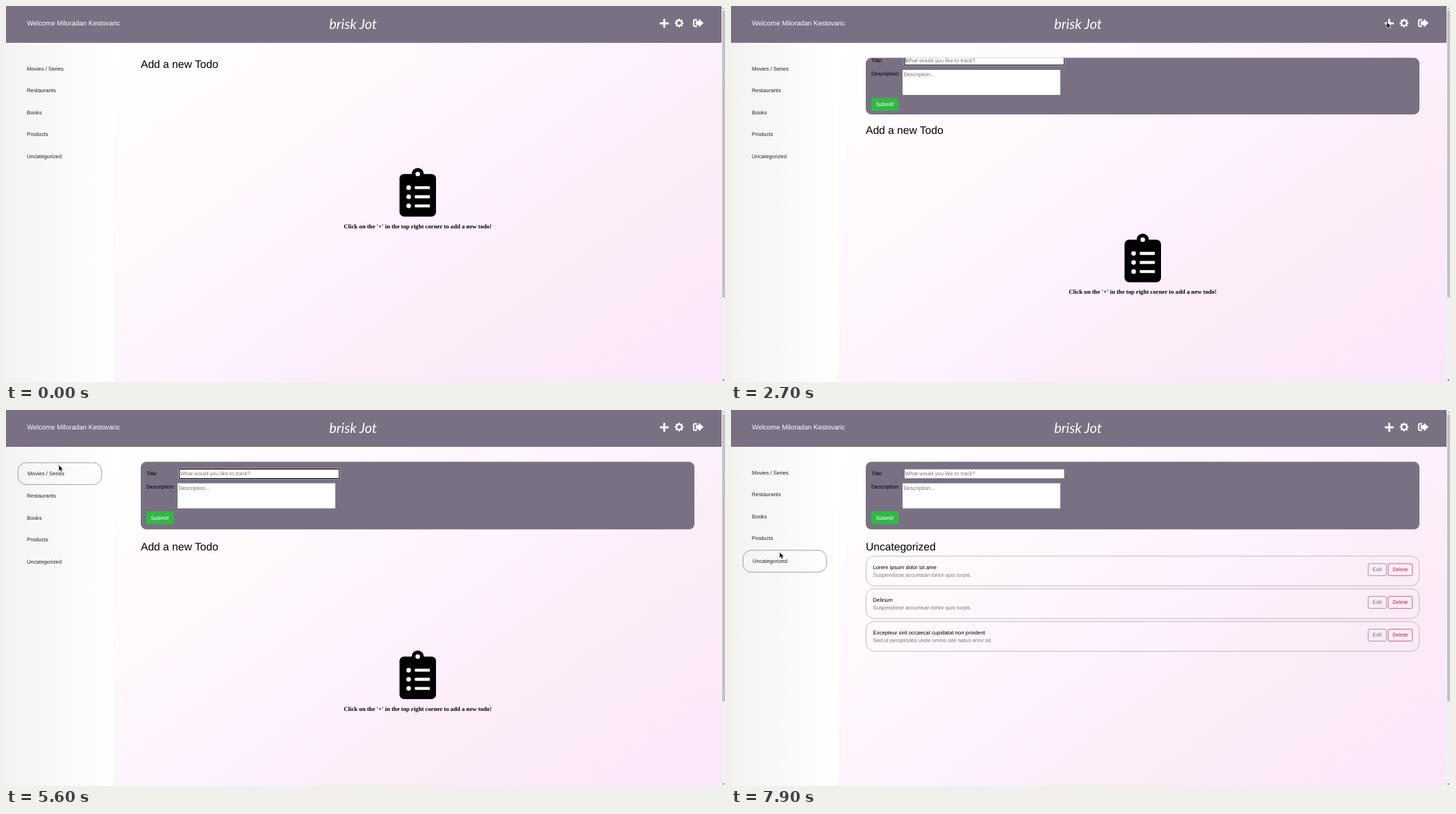
An HTML page for the animation above (8 s loop, 1035 by 541 pixels).

```html
<!DOCTYPE html>
<html lang="en">
<head>
<meta charset="utf-8">
<title>Todo list</title>
<style>
html, body { margin: 0; width: 100%; height: 100%; overflow: hidden; }
svg { display: block; width: 1035px; height: 541px; }
text { font: 7.76px "Liberation Sans", Arial, sans-serif; text-rendering: geometricPrecision; white-space: pre; }
#nav text { fill: #222; }
#heading { font-size: 15.6px; }
.hint { fill: #757575; }
.mid { text-anchor: middle; }
</style>
</head>
<body>
<svg viewBox="0 0 1035 541">
  <defs>
    <linearGradient id="side"><stop stop-color="#f3f4f2"/><stop offset="1" stop-color="#fffffe"/></linearGradient>
    <linearGradient id="page" x2="1" y2="1">
      <stop stop-color="#fff"/><stop offset=".25" stop-color="#fff8fc"/><stop offset=".5" stop-color="#fdf0ff"/>
      <stop offset=".56" stop-color="#fceef8"/><stop offset=".9" stop-color="#fbe6fb"/>
    </linearGradient>
    <clipPath id="clip"><rect id="opening" x="194" y="74.6" width="797" height="0" rx="8"/></clipPath>
    <filter id="shadow" x="-30%" y="-30%" width="160%" height="190%">
      <feDropShadow dx="0" dy="4.3" stdDeviation="4.3" flood-opacity=".2"/>
    </filter>
  </defs>

  <rect x="155" y="53" width="875" height="640" fill="url(#page)"/>
  <rect y="53" width="155" height="488" fill="url(#side)"/>
  <rect width="1030" height="53" fill="#7a7083"/>
  <rect x="1030" width="5" height="541" fill="#f1f1f1"/>
  <rect x="1031" y="6.5" width="4" height="413" fill="#c1c1c1"/>
  <path d="M1031.2 4l1.5-2 1.5 2z" fill="#999"/>
  <path d="M1031.2 537.5l1.5 2 1.5-2z" fill="#444"/>

  <g fill="#fff">
    <text x="30.3" y="28.4" style="font-size:9.72px">Welcome Miloradan Kestovaric</text>
    <text class="mid" x="499.5" y="33" style="font:italic 20px Lato,sans-serif">brisk Jot</text>
  </g>
  <g fill="none" stroke="#fff">
    <path d="M947.6 19.8v10.4M942.4 25h10.4" stroke-width="2.9" stroke-linecap="round"/>
    <circle cx="969" cy="24.5" r="3.8" stroke-width="2.3"/>
    <circle cx="969" cy="24.5" r="5.3" stroke-width="2" pathLength="16" stroke-dasharray="1" stroke-dashoffset=".5"/>
    <path d="M994.7 19.8h-2.8q-2 0-2 2v5.5q0 2 2 2h2.8" stroke-width="1.9"/>
    <path d="M993.2 22h4.7v-2.8l5.8 5.3-5.8 5.4v-2.9h-4.7z" fill="#fff" stroke-width=".8" stroke-linejoin="round"/>
  </g>

  <g id="nav"></g>
  <rect id="pill" x="17.2" width="120.5" height="31.4" rx="12" fill="none" stroke="#666" stroke-width=".6"/>

  <g clip-path="url(#clip)">
    <rect x="194" y="74" width="797" height="99" fill="#7a7083"/>
    <g id="form">
      <text x="202" y="94.2">Title:</text>
      <text x="202" y="113.2">Description:</text>
      <rect x="250" y="85.4" width="229.5" height="12.8" fill="#fff"/>
      <g id="focus" fill="none">
        <rect x="248.5" y="84" width="232" height="15.4" rx="1.8" stroke="#fff" stroke-width=".6"/>
        <rect x="249.4" y="84.9" width="230.2" height="13.7" rx="1" stroke="#101010" stroke-width="1.1"/>
      </g>
      <text class="hint" x="250.8" y="94.2">What would you like to track?</text>
      <path id="caret" d="M251.3 87v9" stroke="#000" stroke-width=".6"/>
      <rect x="247" y="105.5" width="227" height="36" fill="#fff"/>
      <text class="hint" x="248.4" y="114.9">Description...</text>
      <rect x="202" y="146" width="39.6" height="18.5" rx="2.2" fill="#31b845"/>
      <text class="mid" x="221.6" y="158" fill="#fff">Submit!</text>
    </g>
  </g>

  <g id="body">
    <text id="heading" x="194" y="89"></text>
    <g id="empty">
      <rect x="566.5" y="241.7" width="52.5" height="61.3" rx="6.5"/>
      <circle cx="592.7" cy="241.7" r="8.75"/>
      <g id="holes" fill="#fdf4fe"><circle cx="592.7" cy="241.7" r="3.3"/></g>
      <text class="mid" x="592.7" y="319.8" style="font:bold 8.73px 'Liberation Serif',Times,serif">Click on the '+' in the top right corner to add a new todo!</text>
    </g>
  </g>
  <g id="cards"></g>

  <g id="menu">
    <rect x="962.6" y="34.4" width="53.4" height="30.8" fill="#f3f4f4" filter="url(#shadow)"/>
    <text x="970.5" y="48" fill="#0a7fc4">Edit Profile</text>
  </g>
  <path id="cursor" d="M0 0V8.8L2 7l1.4 3 1.5-.7L3.6 6.4H6.3Z" fill="#111" stroke="#fff" stroke-width=".5"/>
</svg>
<script>
const $ = id => document.getElementById(id);
const show = (id, on) => $(id).style.display = on ? '' : 'none';
const shift = (el, x, y) => el.setAttribute('transform', `translate(${x} ${y})`);
const clamp = f => Math.min(1, Math.max(0, f));
const swing = f => .5 - Math.cos(Math.PI * clamp(f)) / 2;

const ROW = 31.5, NAV_TOP = 75.9;
$('nav').innerHTML = ['Movies / Series', 'Restaurants', 'Books', 'Products', 'Uncategorized']
  .map((name, i) => `<text x="30" y="${Math.floor(93 + i * ROW)}">${name}</text>`).join('');

for (let i = 0; i < 3; i++) {
  const y = 261.4 + i * 13.1;
  $('holes').innerHTML += `<circle cx="579.6" cy="${y}" r="3.3"/>
    <rect x="588.4" y="${y - 2.2}" width="21.8" height="4.4" rx="1.1"/>`;
}

const button = (x, w, color, label) =>
  `<rect x="${x}" y="221.1" width="${w}" height="17.2" rx="2" fill="none" stroke="${color}" stroke-width=".7"/>
   <text class="mid" x="${x + w / 2}" y="232.2" fill="${color}">${label}</text>`;
$('cards').innerHTML = [
  ['Lorem ipsum dolor sit ame', 'Suspendisse accumsan tortor quis turpis.'],
  ['Delirium', 'Suspendisse accumsan tortor quis turpis.'],
  ['Excepteur sint occaecat cupidatat non proident', 'Sed ut perspiciatis unde omnis iste natus error sit.']
].map(([title, note], i) => `<g transform="translate(0 ${i * 47.1})">
  <rect x="194.3" y="210.2" width="796.5" height="42.8" rx="12" fill="none" stroke="#999" stroke-width=".6"/>
  <text x="204.5" y="228.7">${title}</text><text x="204.5" y="240" fill="#7b7580">${note}</text>
  ${button(917.2, 26.2, '#7a7083', 'Edit')}${button(946, 34.8, '#b8284f', 'Delete')}</g>`).join('');

// Pointer moves: arrival time, place, travel time
const moves = [
  [1200, 791, 404, 300],
  [1700, 959, 80, 400],
  [2300, 944, 23, 600],   // plus
  [3800, 964, 25, 200],   // gear
  [4600, 994, 27, 800],   // log out
  [5300, 76, 79, 500],    // sidebar, then down its rows
  [6200, 74, 113, 200],
  [6600, 72, 150, 300],
  [6900, 71, 195, 200],
  [7200, 70, 204.5, 200]
];

const pointerAt = t => moves.reduce(([x, y], [end, toX, toY, span]) => {
  const f = swing((t - end + span) / span);
  return [x + (toX - x) * f, y + (toY - y) * f];
}, [130, 484]);

function draw() {
  const t = Math.floor(performance.now() % 8000 / 100) * 100;

  const [x, y] = pointerAt(t);
  show('cursor', t >= 1000);
  shift($('cursor'), x, y);
  show('menu', t >= 3800 && t < 4200);

  const row = Math.floor((y - NAV_TOP) / ROW);
  const hover = x > 17 && x < 138 && row >= 0 && row < 5 ? row : 9;
  show('pill', hover < 5);
  $('pill').setAttribute('y', NAV_TOP + hover * ROW);
  [...$('nav').children].forEach((el, i) =>
    shift(el, i === hover ? 1 : 0, i === hover ? 1.2 : i > hover ? 2.2 : 0));

  const open = swing((t - 2406) / 400);
  $('opening').setAttribute('height', 97.2 * open);
  shift($('form'), 0, (open - 1) * 83);
  shift($('body'), 0, 113 * open);

  const focused = t < 7400;
  show('focus', focused);
  show('caret', focused && Math.floor((t - 2700) / 500) % 2 === 0);
  show('empty', t < 7500);
  show('cards', t >= 7800);
  $('heading').textContent = t < 7500 ? 'Add a new Todo' : t < 7800 ? '' : 'Uncategorized';
  requestAnimationFrame(draw);
}
draw();
</script>
</body>
</html>
```
